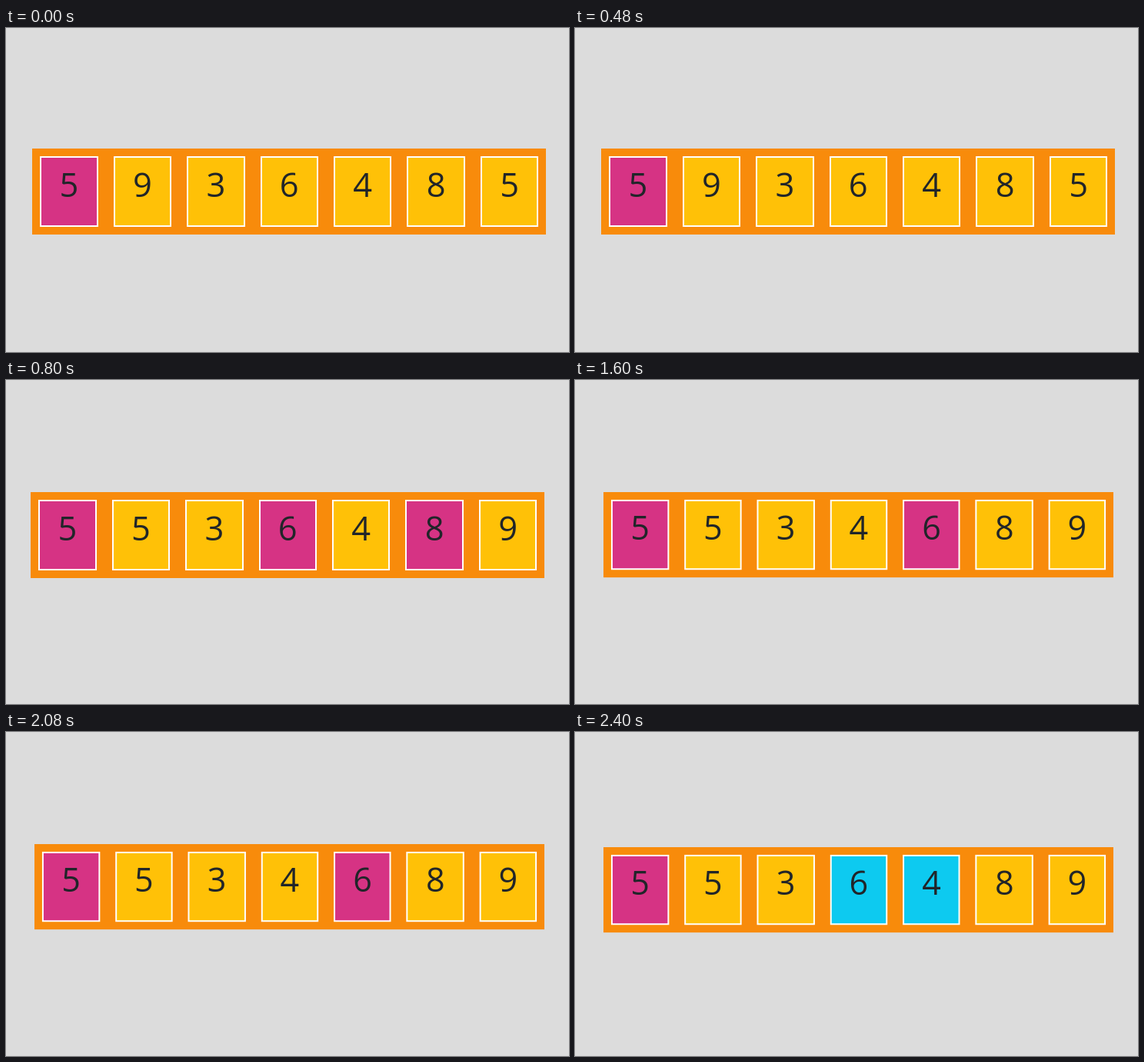
These frames come from a looping animation (732x422 px, 3.2 s). An HTML page with a canvas:

```html
<!DOCTYPE html>
<html lang="en">
<head>
<meta charset="utf-8">
<title>Array sorting steps</title>
<style>
  html, body { margin: 0; height: 100%; overflow: hidden; background: #dcdcdc; }
  canvas { display: block; }
</style>
</head>
<body>
<canvas width="732" height="422"></canvas>
<script>
const ctx = document.querySelector('canvas').getContext('2d');
const STEP_MS = 800;
const BAR = { width: 668, height: 112, padding: 10 };
const PITCH = BAR.width / 7;
const SMALL = 663 / 668;
const COLORS = { y: '#ffc107', p: '#d63384', c: '#0dcaf0' };

const steps = [
  { digits: '5936485', colors: 'pyyyyyy', x: 34, y: 157, scale: 1 },
  { digits: '5536489', colors: 'pyypypy', x: 32, y: 146, scale: 1 },
  { digits: '5534689', colors: 'pyyypyy', x: 37, y: 146, scale: SMALL },
  { digits: '5536489', colors: 'pyyccyy', x: 37, y: 150, scale: SMALL },
];

function drawCell(index, digit, color) {
  const start = BAR.padding + 0.3 + index * PITCH;
  const left = Math.round(start);
  const width = Math.round(start + PITCH - 20) - left;
  const height = BAR.height - 2 * BAR.padding;
  ctx.fillStyle = '#fff';
  ctx.fillRect(left, BAR.padding, width, height);
  ctx.fillStyle = color;
  ctx.fillRect(left + 2, BAR.padding + 2, width - 4, height - 4);
  ctx.fillStyle = '#212529';
  ctx.fillText(digit, start + (PITCH - 20) / 2, 62.5);
}

function draw({ digits, colors, x, y, scale }) {
  ctx.setTransform(1, 0, 0, 1, 0, 0);
  ctx.fillStyle = '#dcdcdc';
  ctx.fillRect(0, 0, 732, 422);
  ctx.setTransform(scale, 0, 0, scale, x, y);
  ctx.fillStyle = '#f88b0b';
  ctx.fillRect(0, 0, BAR.width, BAR.height);
  ctx.font = '43.5px "Open Sans", "Noto Sans", sans-serif';
  ctx.textAlign = 'center';
  [...digits].forEach((digit, i) => drawCell(i, digit, COLORS[colors[i]]));
}

const startTime = performance.now();
function tick() {
  const elapsed = performance.now() - startTime;
  draw(steps[Math.floor(elapsed / STEP_MS) % steps.length]);
  requestAnimationFrame(tick);
}
tick();
</script>
</body>
</html>
```
